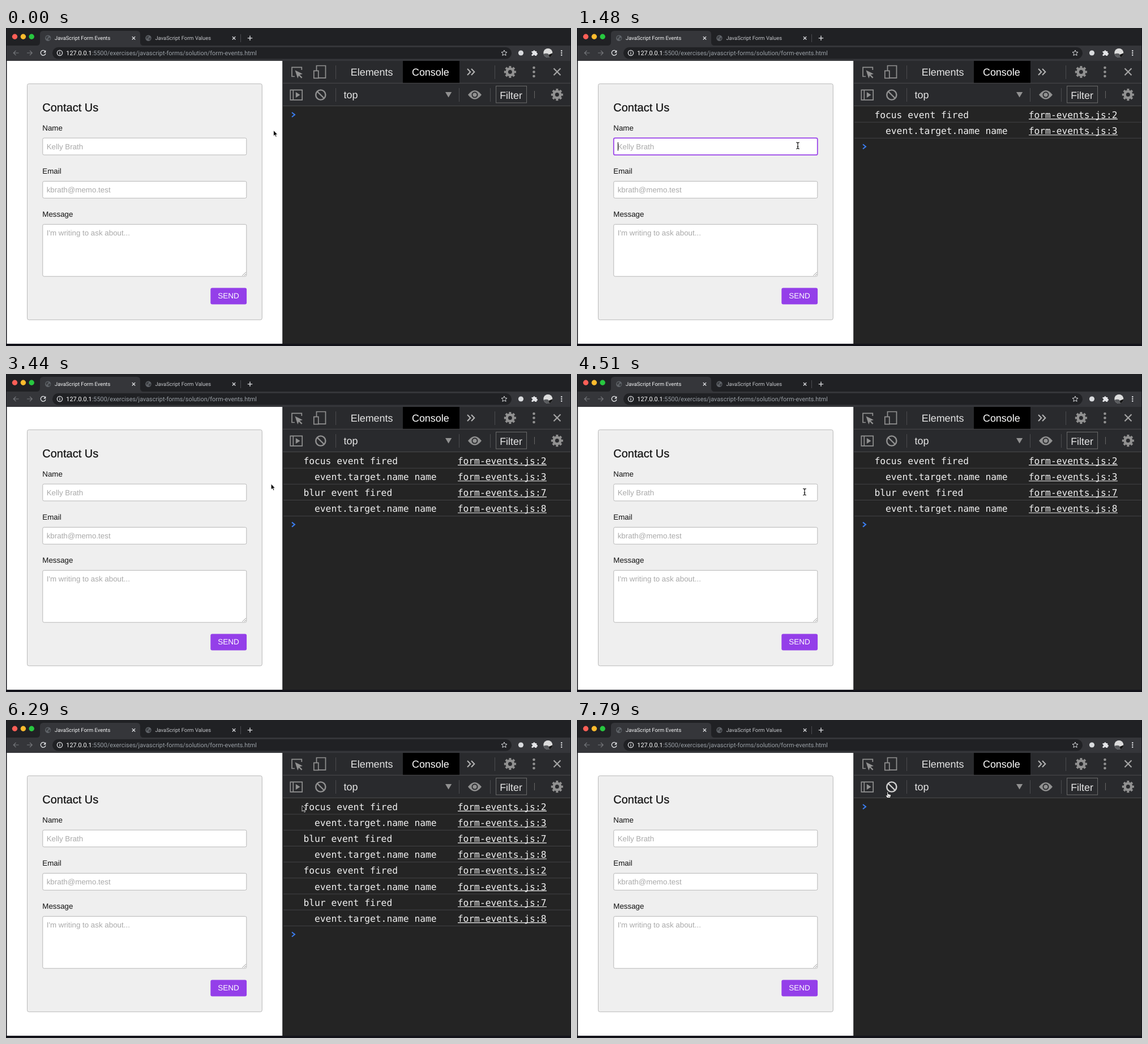
These frames come from a looping animation (998 by 561 pixels, 8 s). An HTML page:

```html
<!DOCTYPE html>
<html lang="en">
<head>
<meta charset="utf-8">
<title>Form events</title>
<style>
html, body { margin: 0; width: 100%; height: 100%; overflow: hidden; background: #14141b; }
svg { display: block; width: 100vw; height: 100vh; }
text { white-space: pre; text-rendering: geometricPrecision; }
.ui { font: 9.4px Roboto, sans-serif; fill: #c3c5c9; }
.url { font-size: 10.9px; fill: #9aa0a6; }
.form { font: 13.35px "Liberation Sans", Arial, sans-serif; fill: #111; }
.hint { fill: #a9a9a9; }
.tools { font: 17.9px "Liberation Sans", Arial, sans-serif; fill: #e6e6e6; }
.mono { font: 16.3px "DejaVu Sans Mono", monospace; fill: #f0f0f0; }
.line { fill: none; stroke: #919191; stroke-width: 1.7; }
.rule { stroke: #4b4b4e; fill: none; }
.light { fill: none; stroke: #e4e5e8; stroke-width: 1.3; }
.field { fill: #fff; stroke: #b7b7b7; }
</style>
</head>
<body>
<svg viewBox="0 0 998 561">
<defs>
  <g id="gear" fill="none" stroke="#919191">
    <circle r="5.8" stroke-width="4.6"/>
    <circle r="9" stroke-width="3.2" pathLength="16" stroke-dasharray="1.1 .9" stroke-dashoffset=".55"/>
  </g>
  <g id="globe">
    <circle r="5.2" fill="#5f6368"/>
    <path d="M-4-2Q-2-4 1-4L0-1-2 1-3 2ZM1 0 4-1Q5 2 2 4L0 2Z" fill="#3b3d41"/>
  </g>
  <path id="cross" d="M-2.7-2.7 2.7 2.7M2.7-2.7-2.7 2.7"/>
  <clipPath id="face"><circle cx="957.3" cy="44" r="8"/></clipPath>
</defs>

<!-- browser frame -->
<rect x="1" width="996" height="557" fill="#202124"/>
<circle cx="15.5" cy="15.3" r="4.7" fill="#fe5f57"/>
<circle cx="30.4" cy="15.3" r="4.7" fill="#febb2e"/>
<circle cx="45.2" cy="15.3" r="4.7" fill="#28c840"/>
<path d="M1 31H54Q60 31 60 25V11Q60 5 66 5H231Q237 5 237 11V25Q237 31 243 31H997V58H1Z" fill="#35363a"/>
<use href="#globe" x="74.2" y="17.8"/>
<use href="#globe" x="251.5" y="17.8"/>
<g class="ui">
  <text x="86" y="21" fill="#f4f5f6" style="fill:#f4f5f6">JavaScript Form Events</text>
  <text x="263.4" y="21">JavaScript Form Values</text>
</g>
<g class="light">
  <use href="#cross" x="225.5" y="17.8"/>
  <use href="#cross" x="402.6" y="17.8"/>
  <path d="M426.8 17.8h8.4M431 13.6v8.4"/>
</g>
<path d="M414.5 11V25" stroke="#4a4c50"/>
<rect x="82" y="34" width="811" height="20.4" rx="10.2" fill="#202124"/>
<path d="M22.5 44H13.5M17.5 39.8 13.3 44 17.5 48.2M37 44H46M42 39.8 46.2 44 42 48.2" fill="none" stroke="#76787c" stroke-width="1.2"/>
<path class="light" d="M69 40.9A4.4 4.4 0 1 0 70 45"/>
<path d="M70.3 39V43.4H66Z" fill="#e4e5e8"/>
<circle class="light" cx="95" cy="44" r="4.6" stroke-width="1.1"/>
<path d="M95 43.3V46.7M95 41.2V42.4" stroke="#e4e5e8" stroke-width="1.2"/>
<text class="ui url" x="106.3" y="47.7"><tspan fill="#fff">127.0.0.1</tspan>:5500/exercises/javascript-forms/solution/form-events.html</text>
<path d="M880 39 881.4 42.3 885 42.6 882.3 45 883.1 48.5 880 46.6 876.9 48.5 877.7 45 875 42.6 878.6 42.3Z" fill="none" stroke="#d5d7da"/>
<circle cx="909.5" cy="44" r="4.6" fill="#d9dbde"/>
<path d="M928.5 41H931.2A1.7 1.7 0 1 1 934.6 41H937.3V43.8A1.7 1.7 0 1 1 937.3 47.2V49H934.4A1.6 1.6 0 0 0 931.2 49H928.5V46.4A1.6 1.6 0 0 0 928.5 43.2Z" fill="#e4e5e8"/>
<g clip-path="url(#face)">
  <path d="M949 36H966V52H949Z" fill="#dcdcdc"/>
  <path d="M949 46Q957 43 959 47L966 45V53H949Z" fill="#595b5e"/>
  <path d="M959 47 966 44V53H960Z" fill="#151515"/>
</g>
<g fill="#e4e5e8"><circle cx="981.3" cy="40.3" r="1.2"/><circle cx="981.3" cy="44" r="1.2"/><circle cx="981.3" cy="47.7" r="1.2"/></g>

<!-- page -->
<rect x="1.5" y="58" width="487" height="499" fill="#fff"/>
<rect x="37.5" y="98.4" width="414.8" height="416.4" rx="3" fill="#efefef" stroke="#b9b9b9"/>
<rect class="field" id="name" x="64.8" y="194.1" width="360" height="29.8" rx="2.5"/>
<rect class="field" x="64.8" y="270.4" width="360" height="29.8" rx="2.5"/>
<rect class="field" x="64.8" y="346.4" width="360" height="91.8" rx="2.5"/>
<path d="M417.5 437 424 430.5M421 437 424 434" stroke="#777" stroke-width=".8"/>
<rect x="361.3" y="458.6" width="63.8" height="29" rx="3" fill="#943fe9"/>
<g class="form">
  <text x="64.3" y="147" font-size="20" style="font-size:20px" stroke="#111" stroke-width=".25">Contact Us</text>
  <text x="64.3" y="181.2">Name</text>
  <text x="64.3" y="257.3">Email</text>
  <text x="64.3" y="333.3">Message</text>
  <g class="hint">
    <text x="71.7" y="214">Kelly Brath</text>
    <text x="71.7" y="290.2">kbrath@memo.test</text>
    <text x="71.7" y="366.1">I'm writing to ask about...</text>
  </g>
  <text x="374.2" y="477.3" style="fill:#fff;font-size:13.5px">SEND</text>
</g>
<path id="caret" d="M72.4 201.5V216.5" stroke="#000"/>

<!-- developer tools -->
<rect x="488" y="58" width="509" height="499" fill="#242424"/>
<rect x="489" y="58" width="508" height="79" fill="#292a2d"/>
<rect x="701" y="58" width="100" height="39" fill="#000"/>
<path class="rule" d="M488.5 58V557M489 97.3H997M489 137.3H997M582.5 66V90M863.5 66V90M582.5 106V130M800.5 106V130M855.5 106V130"/>
<path d="M933.5 111V124" stroke="#666"/>
<g class="line">
  <path d="M510 85.5H505V69.3H522.3V74"/>
  <path d="M548.5 75V66.5H564.5V88.2H552"/>
  <rect x="543.8" y="75.5" width="8" height="13"/>
  <path d="M815 72 820.3 77.5 815 83M822 72 827.3 77.5 822 83" stroke="#b5b5b5" stroke-width="2"/>
  <path d="M967.5 71.3 979.5 83.3M979.5 71.3 967.5 83.3" stroke="#a4a4a4" stroke-width="2.2"/>
  <path d="M502.3 109.4H523.2V126.8H502.3ZM507.3 109V127"/>
  <g id="clear" stroke-width="2.4"><circle cx="555.8" cy="118" r="8.6"/><path d="M549.7 112 561.9 124"/></g>
</g>
<g fill="#919191">
  <path d="M510.5 74.5 524 81 518.7 82.5 523.5 87 521.8 88.7 517.2 84 515.3 89ZM511.8 113 519.5 118 511.8 123ZM776 113H787.2L781.6 122.4Z"/>
  <circle cx="932.5" cy="70" r="2.3"/><circle cx="932.5" cy="77.5" r="2.3"/><circle cx="932.5" cy="85" r="2.3"/>
  <path d="M816 117.8Q828 102 840 117.8Q828 133.6 816 117.8Z"/>
  <circle cx="828" cy="117.8" r="4.6" fill="#919191" stroke="#292a2d" stroke-width="1.9"/>
</g>
<use href="#gear" x="890.4" y="77.5"/>
<use href="#gear" x="973.4" y="117.6"/>
<rect x="865.6" y="102.4" width="54" height="29.6" fill="none" stroke="#6c6c6c"/>
<g class="tools">
  <text x="608.8" y="84">Elements</text>
  <text x="717" y="84" style="fill:#fff">Console</text>
  <text x="596.5" y="124.2">top</text>
  <text x="872.2" y="124.8">Filter</text>
</g>
<g id="log" class="mono"></g>
<path id="prompt" d="M505 149 510 153 505 157" fill="none" stroke="#3b7df0" stroke-width="2"/>
<g id="tip" class="tools">
  <rect x="534" y="140.5" width="240" height="39" rx="2" fill="#000" opacity=".2"/>
  <rect x="535" y="141" width="238" height="37" rx="2" fill="#292a2b"/>
  <text x="547" y="165.7">Clear console</text>
  <text x="668" y="165.7">Ctrl L</text>
  <text x="725" y="165.7"><tspan font-family="DejaVu Sans, sans-serif" font-size="16.5">⌘</tspan></text>
  <text x="748.5" y="165.7">K</text>
</g>

<!-- pointers, each with its hot spot at 0,0 -->
<g id="arrow"><path d="M0 0V10.2L2.4 8 4 11.6 5.7 10.8 4.1 7.4H7.2Z" fill="#000" stroke="#fff" stroke-width=".8"/></g>
<g id="beam"><path d="M-2.7-5.6Q0-5.6 0-4Q0-5.6 2.7-5.6M0-4.5V4.5M-2.7 5.6Q0 5.6 0 4Q0 5.6 2.7 5.6M-1.3 1.7H1.3" fill="none" stroke="#000" stroke-width="1.1"/></g>
<g id="hand"><path d="M-1 1Q0-.6 1 1V4L5 5Q6 5.3 5.6 7L4.6 10.8H-.8L-3.3 7Q-3.5 5.7-2.2 5.8L-1 7Z" fill="#fff" stroke="#000" stroke-width=".8"/><path d="M1.2 7V9.3M3 7V9.3" stroke="#000" stroke-width=".6"/></g>
</svg>
<script>
const LOOP = 8000, PITCH = 28.15;
const $ = id => document.getElementById(id);
const show = (id, on) => $(id).style.display = on ? '' : 'none';
const within = (t, spans) => spans.some(([a, b]) => t >= a && t < b);

const focused = [[1480, 3440], [4600, 5760]];
const caretOn = [[1480, 2020], [2540, 3000], [4600, 5140], [5580, 5760]];
const logTimes = [1480, 3440, 4600, 5760], clearTime = 7700;

// first step, last step, number of steps, end point
const moves = [
  [120, 120, 1, 473, 182], [330, 330, 1, 472.6, 183],
  [780, 860, 2, 395, 203], [1040, 1210, 3, 390, 207.5],
  [2290, 2730, 6, 467, 195], [2910, 3000, 2, 468.2, 193.8],
  [4070, 4510, 6, 402, 208], [4960, 4960, 1, 402, 207.5],
  [5140, 5580, 6, 472.5, 189.6],
  [6120, 6460, 5, 550.5, 130], [6900, 6990, 2, 548.7, 126.6]
];

function pointer(t) {
  let x = 472.5, y = 180.6;
  for (const [from, to, steps, nx, ny] of moves) {
    if (t < from) break;
    const k = t >= to ? 1 : (Math.floor((t - from) / (to - from) * (steps - 1)) + 1) / steps;
    const e = k * k * (3 - 2 * k);
    x += (nx - x) * e;
    y += (ny - y) * e;
  }
  return [x, y];
}

// focus and blur alternate, two rows each
$('log').innerHTML = Array.from({length: 8}, (_, i) => {
  const blur = i % 4 > 1, detail = i % 2;
  const text = detail ? '  event.target.name name' : (blur ? 'blur' : 'focus') + ' event fired';
  const line = (blur ? 7 : 2) + detail;
  return `<g transform="translate(0 ${i * PITCH})">
    <path d="M490 166.2H997" stroke="#424245"/>
    <text x="525.4" y="158.9">${text}</text>
    <text x="797.7" y="158.9">form-events.js:${line}</text>
    <path d="M798 160.6H955" stroke="#f0f0f0" stroke-width="1.1"/></g>`;
}).join('');
const rows = [...$('log').children];

function draw(now) {
  const t = now % LOOP;
  const count = t >= clearTime ? 0 : 2 * logTimes.filter(s => t >= s).length;
  rows.forEach((row, i) => row.style.display = i < count ? '' : 'none');
  $('prompt').setAttribute('transform', `translate(0 ${count * PITCH})`);

  const active = within(t, focused);
  $('name').style.stroke = active ? '#9b45e9' : '';
  $('name').style.strokeWidth = active ? 1.8 : '';
  show('caret', within(t, caretOn));
  show('tip', t >= 6550 && t < 7620);

  const [x, y] = pointer(t);
  const kind = x < 425 ? 'beam' : x > 540 && y < 137 ? 'hand' : 'arrow';
  for (const id of ['arrow', 'beam', 'hand']) show(id, id === kind);
  $(kind).setAttribute('transform', `translate(${x} ${y})`);
  $('clear').style.stroke = kind === 'hand' ? '#d0d0d0' : '';
}

const start = performance.now();
function tick() {
  draw(performance.now() - start);
  requestAnimationFrame(tick);
}
tick();
</script>
</body>
</html>
```
